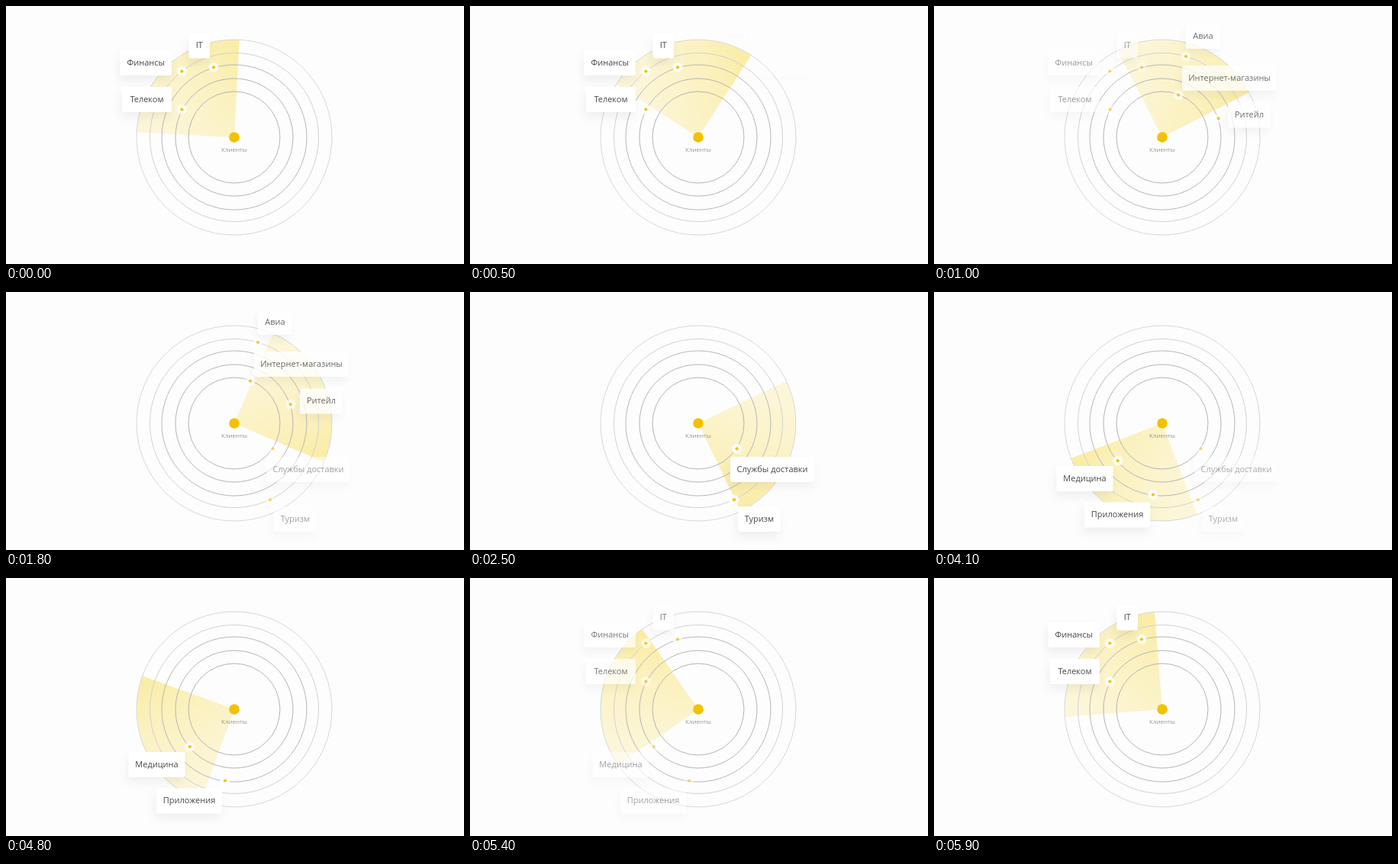
Animation, 600 px wide and 338 px high, one loop 6 s. Source, as an HTML page:

```html
<!DOCTYPE html>
<html lang="ru">
<head>
<meta charset="utf-8">
<title>Клиенты</title>
<style>
  html, body { margin: 0; width: 100%; height: 100%; overflow: hidden; background: #fdfdfd; }
  svg { display: block; width: 600px; height: 338px; }
  text { font-family: "Open Sans", "Noto Sans", sans-serif; text-anchor: middle; }
  .label { font-size: 11px; fill: #484848; }
  .caption { font-size: 8px; fill: #969696; }
  .card { fill: #fff; filter: drop-shadow(-2px 7px 6px rgba(0, 0, 0, .055)); }
  .pin { fill: #f2c200; }
</style>
</head>
<body>
<svg id="stage" viewBox="0 0 600 338">
  <defs>
    <linearGradient id="beam" gradientUnits="userSpaceOnUse" x1="0" y1="-128" x2="-110" y2="-18">
      <stop offset="0" stop-color="#faeca2"/>
      <stop offset=".4" stop-color="#fbf1bf"/>
      <stop offset="1" stop-color="#fcf6d9"/>
    </linearGradient>
    <radialGradient id="halo">
      <stop offset=".7" stop-color="#fff" stop-opacity=".9"/>
      <stop offset="1" stop-color="#fff" stop-opacity=".25"/>
    </radialGradient>
  </defs>
  <path id="sweep" d="M0 0V-128A128 128 0 0 0 -128 0Z" fill="url(#beam)"/>
</svg>
<script>
const LOOP = 6000, STEP = 100, CX = 299, CY = 172;
const stage = document.getElementById('stage');
const sweep = document.getElementById('sweep');

function add(parent, tag, attrs, text) {
  const el = document.createElementNS('http://www.w3.org/2000/svg', tag);
  for (const key in attrs) el.setAttribute(key, attrs[key]);
  if (text) el.textContent = text;
  return parent.appendChild(el);
}

// radius, colour
const rings = [[60, '#b4b4b4'], [77, '#b4b4b4'], [95, '#b8b8b8'], [110.5, '#d2d2d2'], [128, '#d8d8d8']];
for (const [r, stroke] of rings) add(stage, 'circle', { cx: CX, cy: CY, r, stroke, fill: 'none' });

// fade: in start, in end, out start, out end; items: text, card x, y, width, pin x, y
const groups = [
  { fade: [4850, 5700, 6600, 7450], items: [
    ['IT', 239.5, 35.5, 27.5, 272, 80.3],
    ['Финансы', 149.5, 58, 67.5, 230.4, 85.5],
    ['Телеком', 152, 106, 65, 230.4, 135.5]] },
  { fade: [450, 1250, 1550, 2450], items: [
    ['Авиа', 330, 23, 45, 330, 66],
    ['Интернет-магазины', 325, 78, 124, 320, 116.7],
    ['Ритейл', 385, 126.5, 56, 372.8, 147.2]] },
  { fade: [1500, 2100, 3700, 4450], items: [
    ['Службы доставки', 341, 216, 110, 349.6, 205.3],
    ['Туризм', 351, 281, 56, 346, 272.2]] },
  { fade: [2900, 3800, 5000, 5800], items: [
    ['Медицина', 160.5, 228, 74, 240.8, 221],
    ['Приложения', 197, 275.5, 86, 287, 265.5]] }
];

for (const group of groups) {
  group.el = add(stage, 'g', {});
  for (const [text, x, y, width, px, py] of group.items) {
    add(group.el, 'rect', { class: 'card', x, y, width, height: 33, rx: 2 });
    add(group.el, 'circle', { cx: px, cy: py, r: 7, fill: 'url(#halo)' });
    add(group.el, 'circle', { class: 'pin', cx: px, cy: py, r: 2.1 });
    add(group.el, 'text', { class: 'label', x: x + width / 2, y: y + 19.8 }, text);
  }
}

add(stage, 'circle', { class: 'pin', cx: CX, cy: CY, r: 6.8 });
add(stage, 'text', { class: 'caption', x: CX, y: 190.5 }, 'Клиенты');

// time, angle of the leading edge
const turn = [[0, 3], [1000, 62.7], [1800, 113.3], [3200, 195.3], [4100, 249], [5400, 325.2], [5900, 355.5], [6000, 363]];

function angleAt(t) {
  const i = turn.findIndex(([end]) => end > t);
  const [t0, a0] = turn[i - 1], [t1, a1] = turn[i];
  return a0 + (a1 - a0) * (t - t0) / (t1 - t0);
}

function smooth(a, b, t) {
  const u = Math.min(1, Math.max(0, (t - a) / (b - a)));
  return u * u * (3 - 2 * u);
}

function opacityAt([in0, in1, out0, out1], t) {
  if (t + LOOP < out1) t += LOOP;
  return smooth(in0, in1, t) * (1 - smooth(out0, out1, t));
}

function draw() {
  const t = Math.floor(performance.now() % LOOP / STEP) * STEP;
  sweep.setAttribute('transform', `translate(${CX} ${CY}) rotate(${angleAt(t)})`);
  for (const { el, fade } of groups) el.setAttribute('opacity', opacityAt(fade, t));
  requestAnimationFrame(draw);
}
draw();
</script>
</body>
</html>
```
